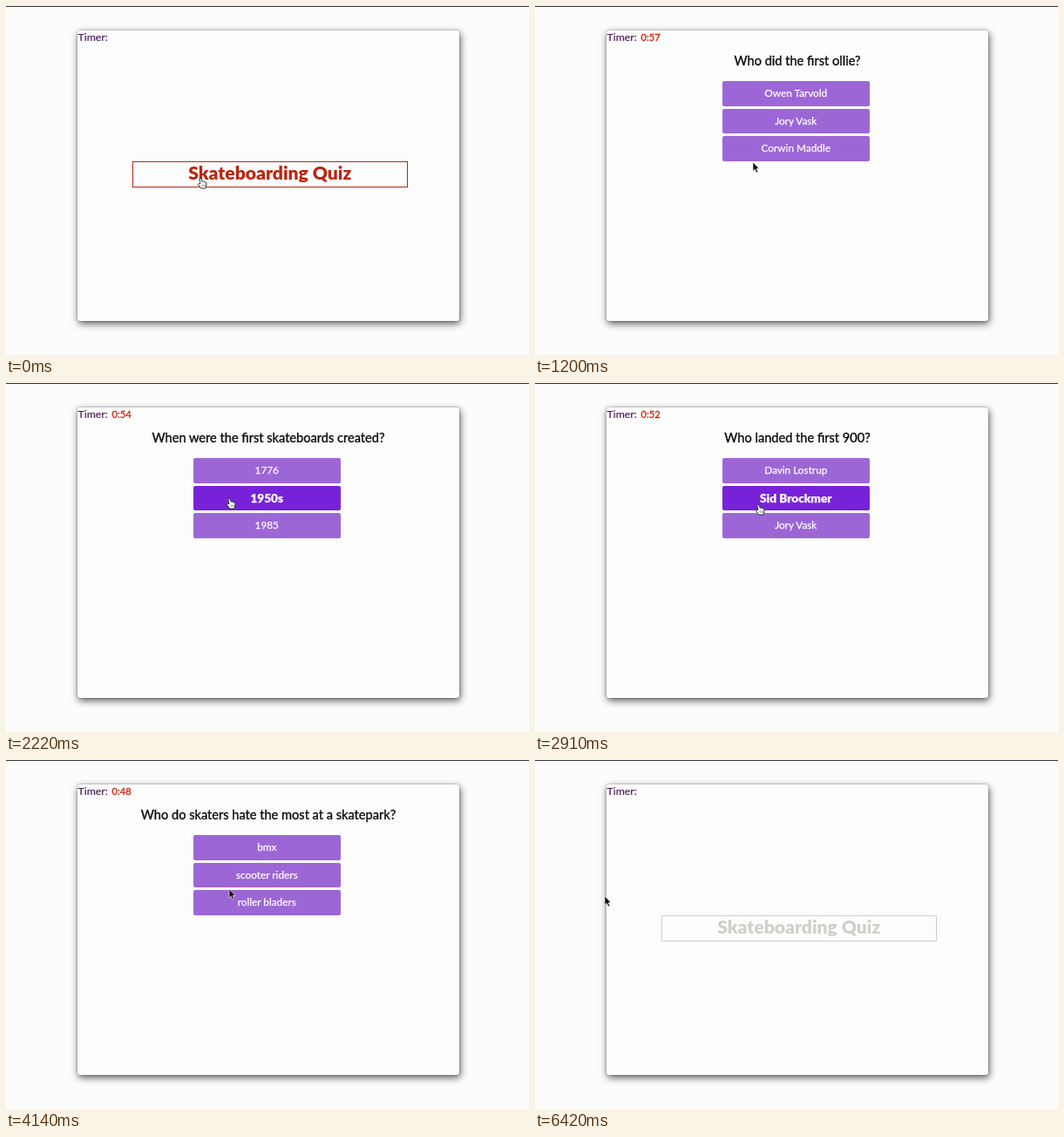
Write an HTML page that moves like this. It is 600 by 400 pixels and loops after 6450 ms.

```html
<!DOCTYPE html>
<html lang="en">
<head>
<meta charset="utf-8">
<title>Quiz</title>
<style>
  html, body { margin: 0; width: 100%; height: 100%; overflow: hidden; background: #fcfcfc; }
  #stage { position: relative; width: 600px; height: 400px; overflow: hidden; font-family: Lato, "Open Sans", sans-serif; }
  #stage * { position: absolute; box-sizing: border-box; white-space: pre; }
  #bar { left: 0; top: 0; width: 600px; height: 1.4px; background: #333; }
  .panel { background: #fdfdfd; border-radius: 3px; box-shadow: 1px 3px 9px rgba(0, 0, 0, .65), 0 0 2px rgba(0, 0, 0, .4); }
  #card { left: 82px; top: 28px; width: 438px; height: 333px; }
  #label, #clock { top: 27px; line-height: 17px; }
  #label { left: 82.5px; font-size: 12.3px; color: #4f1a5c; -webkit-text-stroke: .2px; }
  #clock { left: 121.5px; font-size: 11.2px; color: #cc2a14; -webkit-text-stroke: .35px; }
  #start { left: 145px; top: 178px; width: 315.5px; height: 29.5px; border: 1.3px solid; text-align: center; font-size: 21.1px; line-height: 23px; font-weight: 900; }
  #ask { left: 101px; top: 53px; width: 400px; text-align: center; font-size: 14.6px; line-height: 20px; color: #0c0c0c; -webkit-text-stroke: .35px; }
  .answer { left: 215px; width: 168.5px; height: 28.5px; border-radius: 2px; background: #9d66d6; color: #fff; text-align: center; font-size: 11.8px; line-height: 28.5px; -webkit-text-stroke: .25px; }
  .answer.on { background: #7722d8; font-size: 13.6px; font-weight: 900; }
  #result { left: 254px; top: 257px; width: 94px; height: 100px; }
  #result svg { left: 27px; top: 8px; }
  #score { left: 0; top: 64px; width: 94px; text-align: center; font-size: 18.6px; line-height: 20px; font-weight: 900; color: #222; }
  #arrow, #hand { left: 0; top: 0; overflow: visible; }
</style>
</head>
<body>
<div id="stage">
  <div id="bar"></div>
  <div id="card" class="panel"></div>
  <div id="label">Timer:</div>
  <div id="clock"></div>
  <div id="start">Skateboarding Quiz</div>
  <div id="quiz"><div id="ask"></div></div>
  <div id="result" class="panel">
    <svg width="40" height="42" viewBox="0 0 40 42">
      <ellipse cx="20" cy="20.5" rx="17.4" ry="18.4" fill="#ea7040" stroke="#4f3a34" stroke-width="1.3"/>
      <g fill="#fff" stroke="#4f3a34" stroke-width=".7">
        <circle cx="13" cy="17" r="3.5"/><circle cx="27.5" cy="17" r="3.5"/>
      </g>
      <circle cx="13.3" cy="17" r="1.6" fill="#222"/><circle cx="27.2" cy="17" r="1.6" fill="#222"/>
      <path d="M14.2 30.5Q20 25.3 25.8 30.5" fill="none" stroke="#4a3028" stroke-width="1.3"/>
    </svg>
    <div id="score">25%</div>
  </div>
  <svg id="arrow" width="9" height="14">
    <path d="M0 0V10.2L2.3 8.2L4 12L5.8 11.2L4.1 7.5H7.2Z" fill="#111" stroke="#fff" stroke-width=".6"/>
  </svg>
  <svg id="hand" width="12" height="14">
    <path d="M-1.2 1Q0 -.7 1 1L2.2 4.2Q3.3 3.2 4 4.5Q5.2 3.8 5.6 5Q6.8 4.5 7 6L6.8 9L5.8 12H.8L-2.6 7.6Q-2.6 6 -.6 6.8L0 6Z" fill="#fff" stroke="#333" stroke-width="1"/>
    <path d="M2 7.5V10M3.7 7.5V10M5.3 7.5V10" stroke="#333" stroke-width=".5"/>
  </svg>
</div>
<script>
const LOOP = 6450, BEGIN = 270, PER_QUESTION = 1130, TICK = 300, RELOAD = 5850;

const questions = [
  ["Who did the first ollie?", "Owen Tarvold", "Jory Vask", "Corwin Maddle"],
  ["When were the first skateboards created?", "1776", "1950s", "1985"],
  ["Who landed the first 900?", "Davin Lostrup", "Sid Brockmer", "Jory Vask"],
  ["Who do skaters hate the most at a skatepark?", "bmx", "scooter riders", "roller bladers"]
];
const SCORED = BEGIN + PER_QUESTION * questions.length;

// Where the pointer tip rests; sway is how far it wanders on the way there.
const stops = [
  { t: 0, x: 223, y: 197 },
  { t: BEGIN, x: 225, y: 199 },
  { t: 690, x: 268, y: 98 },
  { t: 1200, x: 250, y: 179 },
  { t: 2220, x: 256, y: 132, sway: 20 },
  { t: 3390, x: 256, y: 118, sway: 30 },
  { t: 4500, x: 256, y: 122, sway: 30 },
  { t: 5280, x: 256, y: 122 },
  { t: 5700, x: -14, y: -20 },
  { t: 6150, x: -14, y: -20 },
  { t: 6420, x: 80, y: 156 }
];

const el = id => document.getElementById(id);
const show = (node, on) => { node.style.display = on ? "block" : "none"; };
const clamp = v => Math.max(0, Math.min(1, v));
const inside = ([x, y], left, top, w, h) => x >= left && x <= left + w && y >= top && y <= top + h;

const rowTop = i => 86 + 31.5 * i;
const rows = [0, 1, 2].map(i => {
  const row = document.createElement("div");
  row.className = "answer";
  row.style.top = rowTop(i) + "px";
  el("quiz").append(row);
  return row;
});

function pointerAt(t) {
  const next = stops.find(s => s.t > t);
  if (!next) return [stops.at(-1).x, stops.at(-1).y];
  const last = stops[stops.indexOf(next) - 1];
  const k = (t - last.t) / (next.t - last.t), ease = k * k * (3 - 2 * k);
  const sway = (next.sway || 0) * Math.sin(2 * Math.PI * k);
  return [last.x + (next.x - last.x) * ease, last.y + (next.y - last.y) * ease - sway];
}

function drawQuestion(t, tip) {
  const step = Math.floor((t - BEGIN) / PER_QUESTION);
  const [ask, ...answers] = questions[Math.min(step, questions.length - 1)];
  el("ask").textContent = ask;
  rows.forEach((row, i) => {
    row.textContent = answers[i];
    row.classList.toggle("on", inside(tip, 215, rowTop(i), 168.5, 28.5));
  });
  return rows.some(row => row.classList.contains("on"));
}

function drawTitle(t, tip) {
  const hot = inside(tip, 145, 178, 315, 29);
  const style = el("start").style;
  style.color = style.borderColor = hot ? "#b9260f" : "#d0d0ca";
  style.opacity = t < RELOAD ? 1 : clamp((t - RELOAD) / 540);
  return hot;
}

function draw(t) {
  const tip = pointerAt(t);
  const playing = t >= BEGIN && t < RELOAD;
  const hot = playing ? drawQuestion(t, tip) : drawTitle(t, tip);
  show(el("start"), !playing);
  show(el("quiz"), playing);

  const ticks = Math.floor((t - BEGIN) / TICK);
  el("clock").textContent = playing && ticks > 0 ? "0:" + (60 - ticks) : "";

  show(el("result"), playing && t >= SCORED);
  el("result").style.opacity = clamp((t - SCORED) / 300);

  show(el("hand"), hot);
  show(el("arrow"), !hot);
  el("hand").style.transform = el("arrow").style.transform =
    `translate(${Math.round(tip[0])}px, ${Math.round(tip[1])}px)`;
}

const began = performance.now();
function frame() {
  draw((performance.now() - began) % LOOP);
  requestAnimationFrame(frame);
}
frame();
</script>
</body>
</html>
```
